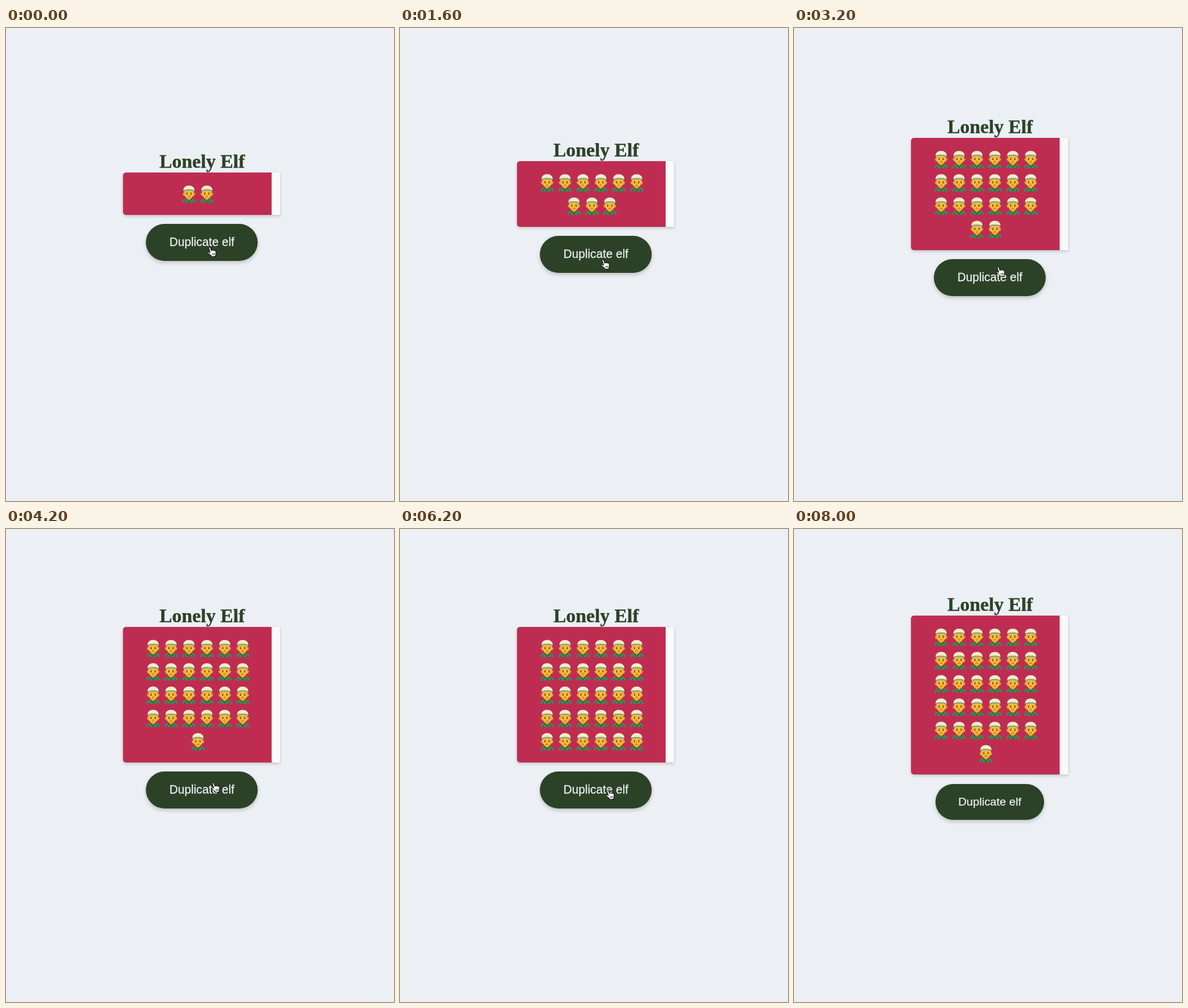
An HTML page for the animation above (8200 ms loop, 650 by 792 pixels).

```html
<!DOCTYPE html>
<html lang="en">
<head>
<meta charset="utf-8">
<title>Lonely Elf</title>
<style>
  html, body { margin: 0; width: 100%; height: 100%; overflow: hidden; background: #ecf0f5; }
  #stage { position: relative; width: 650px; height: 792px; overflow: hidden; }
  #app { position: absolute; left: 196px; width: 263px; }
  h1 {
    position: absolute; top: -37px; left: 0; width: 265px; margin: 0; text-align: center;
    font: bold 32px/37px "Liberation Serif", Times, serif; color: #2c4227;
    -webkit-text-stroke: .4px;
  }
  #box {
    box-sizing: border-box; background: #be2d51; border-right: 14px solid #f9f9fa;
    border-radius: 5px 0 0 5px; box-shadow: 0 2px 5px rgba(0, 0, 0, .2);
  }
  #button {
    position: absolute; left: 40.8px; width: 182.4px; height: 60.4px; margin-top: 15.8px;
    border-radius: 31px; background: #2c4227; color: #ecf0f5; text-align: center;
    font: 19.2px/60.4px "Liberation Sans", Arial, sans-serif; -webkit-text-stroke: .25px;
    box-shadow: 0 3px 6px rgba(0, 0, 0, .2);
  }
  svg { position: absolute; left: 0; top: 0; width: 650px; height: 792px; }
</style>
</head>
<body>
<div id="stage">
  <div id="app">
    <h1>Lonely Elf</h1>
    <div id="box"></div>
    <div id="button">Duplicate elf</div>
  </div>
  <svg viewBox="0 0 650 792">
    <defs>
      <g id="elf" fill="none" stroke-linecap="round">
        <path fill="#43875a" d="M-11 28.7V26.5Q-10.5 23.2-5 22.4H5Q10.5 23.2 11 26.5V28.7Z"/>
        <path fill="#c98a22" d="M-3.3 19h6.6v4L0 26-3.3 23Z"/>
        <path stroke="#2a5f40" stroke-width="1.5" d="M-4 23.2 0 27 4 23.2M0 27v1M-7 26.3v1.6M7 26.3v1.6"/>
        <path fill="#eda829" d="M-7 13.5-10.6 12.2Q-10.4 17-6.8 18ZM7 13.5 10.6 12.2Q10.4 17 6.8 18Z"/>
        <path fill="#fcc034" d="M-7.8 11Q-8 5 0 5T7.8 11C7.8 18 4.5 22.4 0 22.4S-7.8 18-7.8 11Z"/>
        <path fill="#b9b384" d="M-8.8 9C-9.5 5 9.5 5 8.8 9L8.2 13.5Q7.2 10 4 9.4H-4Q-7.2 10-8.2 13.5Z"/>
        <path fill="#f4edc6" d="M-9.2 8.6C-10.4-2.9 10.4-2.9 9.2 8.6Q5 6.2 0 6.2T-9.2 8.6Z"/>
        <path stroke="#84987c" stroke-width="1.5" d="M-8 8.6Q-4 7.2 0 7.2T8 8.6"/>
        <path stroke="#a06d26" stroke-width=".9" d="M-5 12q1.5-.8 3-.1M5 12q-1.5-.8-3-.1M-1 16.6q1 .6 2 0"/>
        <path stroke="#4b3420" stroke-width="1.9" d="M-3.5 13.8v.8M3.5 13.8v.8"/>
        <path stroke="#a8501f" d="M-2.2 19q2.2.8 4.4 0"/>
      </g>
    </defs>
    <g id="elves"></g>
    <g id="hand" stroke="#000" stroke-linejoin="round">
      <path fill="#fff" d="M-1.3 1.2C-1.5-.2.9-.5 1.4.9L3 6C3.2 4.6 5.2 4.6 5.6 5.8 6 4.8 7.6 4.8 8 6.1 8.8 5.3 10 5.7 10.3 7 11 9.5 11 12 9.8 14.2V15.5L4 16C3 13.5 0 11.5-2.4 10-3.6 8.6-2 7.6-.6 8.4L1 9.4Z"/>
      <path stroke-width=".8" d="M4.6 10.5l.6 3M6.5 10.3l.5 3M8.4 10l.3 3"/>
    </g>
  </svg>
</div>
<script>
  const $ = id => document.getElementById(id);
  const LOOP = 8200, STEP = 200, PER_ROW = 6, MAX = 31, LEAVE = 7200;

  // time, elf count, pointer x, pointer y
  const keys = [
    [0, 2, 341, 367], [1600, 9, 340, 388], [2200, 13, 341, 389],
    [3200, 20, 342, 400], [3600, 23, 344, 410], [3800, 23, 345, 415],
    [4200, 25, 347, 425], [5000, 28, 348, 437], [5600, 30, 348, 437],
    [6600, 30, 348, 437], [6800, 31, 348, 437], [LOOP, 31, 348, 437]
  ];

  const elves = Array.from({ length: MAX }, () => {
    const elf = document.createElementNS("http://www.w3.org/2000/svg", "use");
    elf.setAttribute("href", "#elf");
    return $("elves").appendChild(elf);
  });

  const place = (el, x, y) => el.setAttribute("transform", `translate(${x} ${y})`);

  function stateAt(t) {
    const i = keys.findIndex(k => k[0] > t);
    const a = keys[i - 1], b = keys[i];
    const p = (t - a[0]) / (b[0] - a[0]);
    return a.map((v, j) => Math.round(v + (b[j] - v) * p));
  }

  function draw(t) {
    const [, count, x, y] = stateAt(t);
    const rows = Math.ceil(count / PER_ROW);
    const top = Math.ceil(261.5 - 19.5 * rows);
    const hover = t < LEAVE;

    $("app").style.top = top + "px";
    $("box").style.height = 32 + 39 * rows + "px";
    $("button").style.transform = hover ? "scale(1.03)" : "none";

    elves.forEach((elf, i) => {
      const row = Math.floor(i / PER_ROW);
      const inRow = Math.min(PER_ROW, count - row * PER_ROW);
      elf.style.display = i < count ? "" : "none";
      place(elf, 321.5 + 30 * (i % PER_ROW - (inRow - 1) / 2), top + 21.7 + 39 * row);
    });

    $("hand").style.display = hover ? "" : "none";
    place($("hand"), x, y);
  }

  const start = performance.now();
  function tick() {
    const t = (performance.now() - start) % LOOP;
    draw(Math.floor(t / STEP) * STEP);
    requestAnimationFrame(tick);
  }
  tick();
</script>
</body>
</html>
```
